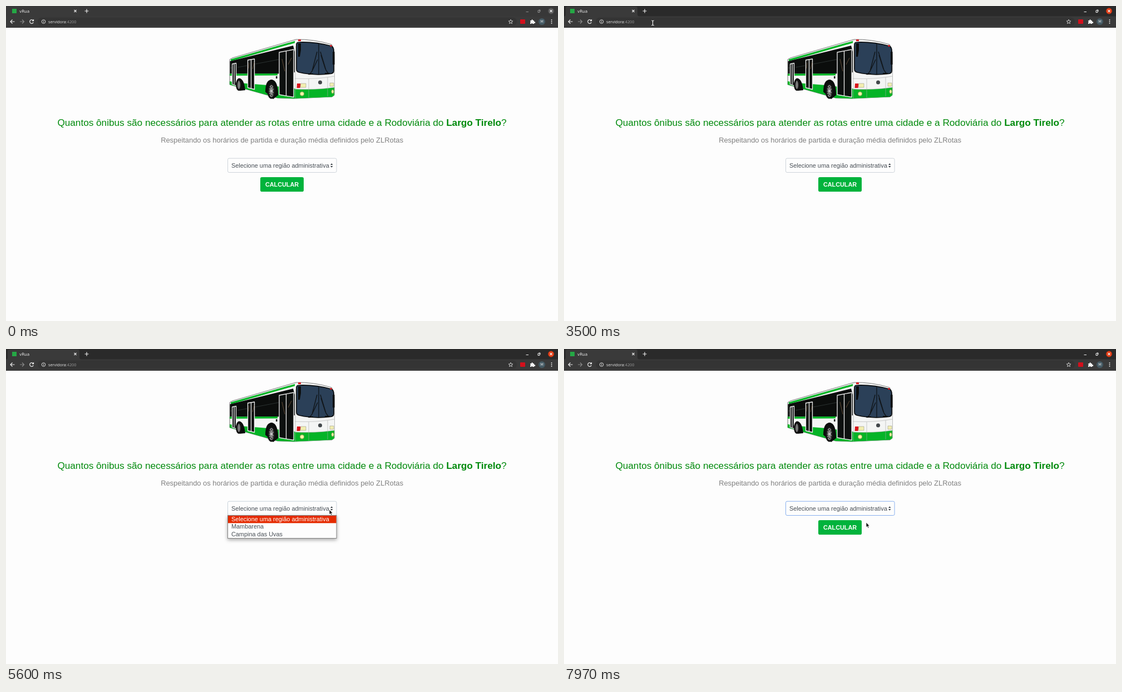
Animation of 992x565 px, one loop 8000 ms. Source, as an HTML page:

```html
<!DOCTYPE html>
<html lang="pt-BR">
<head>
<meta charset="utf-8">
<title>vRua</title>
<style>
  html, body { margin: 0; width: 100%; height: 100%; overflow: hidden; background: #fdfdfd; }
  svg { display: block; width: 100vw; height: 100vh; }
  text { font-family: "Liberation Sans", Arial, sans-serif; }
  .mid { text-anchor: middle; }
  .heading { font-size: 17.18px; fill: #008a0c; }
  .lead { font-size: 12.9px; fill: #808080; }
  .field { font-size: 10.92px; fill: #495057; }
  .button { font-size: 10.85px; font-weight: bold; fill: #fff; }
  .tab { font: 7.3px "DejaVu Sans", sans-serif; fill: #e4e4e4; }
  .address { font: 7.3px "Open Sans", sans-serif; fill: #e8e8e8; }
  .icon { fill: none; stroke: #eee; stroke-width: 1.2; }
  .green { fill: #05b427; }
  .white { fill: #f4f5f4; }
  .black { fill: #0b0d0c; }
  .glass { fill: #0d100f; stroke: #eee; stroke-width: 1.3; }
</style>
</head>
<body>
<svg viewBox="0 0 992 565" preserveAspectRatio="none">
  <defs>
    <filter id="shadow" x="-10%" y="-20%" width="120%" height="160%">
      <feDropShadow dx="0" dy="2.5" stdDeviation="3" flood-opacity=".35"/>
    </filter>
  </defs>
  <rect width="992" height="565" fill="#fdfdfd"/>

  <!-- Browser bar -->
  <rect id="strip" width="992" height="20"/>
  <path d="M0 39V18.500Q3 18.500 3 15V4Q3 1 6 1H129Q132 1 132 4V15Q132 18.500 136 18.500H992V39Z" fill="#3a3a3a"/>
  <rect x="57" y="20.500" width="861" height="15" rx="7.500" fill="#343434"/>
  <rect x="11" y="5" width="8" height="8" fill="#25a845"/>
  <text class="tab" x="24" y="11.700">vRua</text>
  <g class="icon">
    <path d="M122.500 7l4 4m0-4l-4 4M141.500 9h7M145 5.500v7"/>
    <path d="M15.500 28H8M11.500 24.500L8 28l3.500 3.500"/>
    <path d="M25 28h7.500M29 24.500l3.500 3.500-3.500 3.500" stroke="#888"/>
    <path d="M49 26A3.400 3.400 0 1 0 49.300 29.300M49.500 24v2.700h-2.700"/>
    <circle cx="67.500" cy="28" r="3.300" stroke-width=".9"/>
    <path d="M67.500 27.500v2.300M67.500 25.900v.9" stroke-width=".9"/>
    <path d="M907 24.300l1.100 2.500 2.700.2-2.100 1.800.7 2.700-2.400-1.500-2.400 1.500.7-2.700-2.100-1.800 2.700-.2Z" stroke-width=".8"/>
  </g>
  <text class="address" x="76" y="30.600">servidora<tspan fill="#999">:4200</tspan></text>
  <rect x="924" y="24" width="9" height="8" rx="1" fill="#d3101c"/>
  <path d="M942 26h2.300a1.400 1.400 0 1 1 2.700 0H949v2.300a1.400 1.400 0 1 1 0 2.300V32H946.500a1.300 1.300 0 0 0-2.500 0H942v-2.400a1.300 1.300 0 0 0 0-2.400Z" fill="#f4f4f4"/>
  <circle cx="963" cy="28" r="6" fill="#455a64"/>
  <text class="tab mid" x="963" y="30.400" style="font-size:6.5px">M</text>
  <g fill="#eee"><circle cx="980.500" cy="25" r=".9"/><circle cx="980.500" cy="28" r=".9"/><circle cx="980.500" cy="31" r=".9"/></g>
  <g id="controls" class="icon" style="stroke-width:1">
    <path d="M934.500 10.500h4.500M956 8h3v3.500h-3ZM957.500 7h2.500v3"/>
  </g>
  <circle id="close" cx="979.500" cy="9" r="5.400"/>
  <path class="icon" d="M977.500 7l4 4m0-4l-4 4"/>

  <!-- Bus -->
  <g stroke-linejoin="round">
    <path class="white" d="M402 96L407 93 521 60Q552 59 585 69Q590 75 590 92V160L586 163 519 166 488 165 402 141Z" stroke="#444" stroke-width=".7"/>
    <path class="green" d="M404 95.500L520 62.500V66L404 99Z"/>
    <path class="black" d="M402.500 99L516 71 519 82V119L488 121.500 402.500 121.500Z"/>
    <path class="green" d="M402 121.500L488 121V124.500L402 125Z"/>
    <path class="green" d="M402 135L420 138 470 142 519 148V166L488 165 402 141Z"/>
    <path d="M403 111h3M416 110l17-3M448 104l42-8" stroke="#343c3a" stroke-width=".8"/>
    <g class="glass">
      <path d="M406.500 104L413.500 102.500V143L406.500 140.500ZM410 103.500V141.500"/>
      <path d="M434.500 97L446.500 95V149.500L434.500 146.500ZM440.500 96V148"/>
      <path d="M491 83L517 78V163.500L491 159ZM503.500 81V161.500"/>
    </g>
    <path d="M437 102l-1 10M443 113l3-12M496 95l5 22M507 105l6-12" fill="none" stroke="#775a40" stroke-width=".8"/>
    <path class="black" d="M413 140Q415 127 421 130Q428 133 430 151L420 152Z"/>
    <path class="black" d="M466 154Q466 132 478 132Q489 134 489 160L480 167Z"/>
    <g stroke="#111" stroke-width="2.800">
      <ellipse cx="418.500" cy="141.500" rx="4" ry="9" fill="#777"/>
      <ellipse cx="477" cy="152.500" rx="6" ry="12.500" fill="#888"/>
    </g>
    <ellipse cx="477" cy="152.500" rx="4" ry="8" fill="none" stroke="#191919" stroke-width="2" stroke-dasharray="2 2"/>
    <circle cx="477" cy="152.500" r="2" fill="#ccc"/>
    <path class="white" d="M519 63Q553 61 586 71L590 85V160L586 163 519 166Z"/>
    <path class="green" d="M519 149Q556 151 590 146V160L586 163 519 166Z"/>
    <path d="M519 149Q556 151 590 146M519 130Q557 132 590 126M520 72V166M544 131v33M578 128v34" fill="none" stroke="#aaa" stroke-width=".6"/>
    <path d="M522 69Q522 65 527 65Q556 64 585 72Q589 74 589 81V116Q589 121 583 121.500Q553 125 527 119Q522 118 522 113Z" fill="#2b4058" stroke="#090c0f" stroke-width="1.700"/>
    <path d="M562 67V122" stroke="#0b1014" stroke-width="1.200"/>
    <path d="M545 123l5-6 10-21M580 122l-5-7-10-33M550 117l9-35M574 113l-8-25" fill="none" stroke="#11161a" stroke-width="1.400"/>
    <path d="M525 67h5v12l-2 12h-3ZM587 82h3.500v23H587Z" class="black"/>
    <path d="M525 60h5v3h-5ZM582.500 70h3v3h-3ZM523 139h6.500l-1 8h-6Z" fill="#d8141b"/>
    <path d="M530 139h9v7h-10ZM582 138h7v6h-7Z" fill="#f3efb0" stroke="#998" stroke-width=".6"/>
    <g fill="#f7f6a6" stroke="#7c9b51" stroke-width="1"><circle cx="532" cy="157.500" r="3.700"/><ellipse cx="587" cy="153.500" rx="2.200" ry="3.500"/></g>
    <path class="black" d="M485 126h2.500v4H485ZM543 121h9v2h-9ZM573 120h9v2h-9Z"/>
    <circle cx="564.500" cy="137" r="3.500" fill="#42474a"/>
  </g>

  <!-- Form -->
  <text class="heading mid" x="496" y="215">Quantos ônibus são necessários para atender as rotas entre uma cidade e a Rodoviária do <tspan font-weight="bold">Largo Tirelo</tspan>?</text>
  <text class="lead mid" x="496" y="245.400">Respeitando os horários de partida e duração média definidos pelo ZLRotas</text>
  <rect id="select" x="398.500" y="273.200" width="195.500" height="25.300" rx="2.500" fill="#fdfdfd"/>
  <text class="field" x="404.900" y="289.800">Selecione uma região administrativa</text>
  <path d="M583 285l2.200-2.700 2.200 2.700ZM583 287l2.200 2.700 2.200-2.700Z" fill="#343a40"/>
  <rect x="457" y="307" width="78" height="26" rx="2.800" fill="#00b33c"/>
  <text class="button mid" x="496" y="324.100">CALCULAR</text>

  <g id="menu">
    <rect x="398.500" y="298.500" width="195.500" height="41" fill="#fdfdfd" stroke="#777" stroke-width=".9" filter="url(#shadow)"/>
    <rect id="highlight" x="399" width="194.500" height="13.300" fill="#e52b00"/>
    <text class="field option" x="404.900" y="309.100">Selecione uma região administrativa</text>
    <text class="field option" x="404.900" y="322.400">Mambarena</text>
    <text class="field option" x="404.900" y="335.700">Campina das Uvas</text>
  </g>

  <g id="cursor">
    <path id="arrow" d="M0 0V8.700L2 7 3.500 10.200 5 9.500 3.600 6.400H6.200Z" fill="#161616" stroke="#fff" stroke-width=".7"/>
    <path id="beam" d="M-2.200-4Q0-4 0-3V4Q0 4.600-2.200 4.600M2.200-4Q0-4 0-3V4Q0 4.600 2.200 4.600" fill="none" stroke="#fff" stroke-width="1.100"/>
  </g>
</svg>
<script>
  const LOOP = 8000, APPEAR = 700, FOCUS = 3450, OPEN = 5590, CLOSE = 7700;
  const ROW = 13.3, MENU_TOP = 299;
  const path = [ // time, x, y
    [0, 500, 335], [780, 500, 335], [1270, 384, 229], [1480, 384, 229],
    [1500, 379, 219], [1930, 141, 93], [2260, 141, 93], [2700, 159.5, 30],
    [4250, 159.5, 30], [4770, 284, 70], [5450, 581, 288], [5850, 581, 288],
    [6500, 530, 321], [7260, 530, 321], [7600, 541, 304], [7700, 541, 304],
    [7940, 543, 311], [LOOP, 543, 311]
  ];
  const el = id => document.getElementById(id);
  const options = document.querySelectorAll(".option");
  const show = (id, on) => el(id).setAttribute("visibility", on ? "visible" : "hidden");
  const paint = (id, attr, value) => el(id).setAttribute(attr, value);

  function cursorAt(t) {
    const i = path.findIndex(p => p[0] > t);
    const [t0, x0, y0] = path[i - 1], [t1, x1, y1] = path[i];
    const u = (t - t0) / (t1 - t0), k = u * u * (3 - 2 * u);
    return [x0 + (x1 - x0) * k, y0 + (y1 - y0) * k];
  }

  function draw(now) {
    const t = now % LOOP;
    const [x, y] = cursorAt(t);
    const focused = t >= FOCUS, open = t >= OPEN && t < CLOSE;
    const visible = t >= APPEAR, overAddress = y > 19 && y < 38;

    paint("strip", "fill", focused ? "#2a2a2a" : "#383838");
    paint("close", "fill", focused ? "#e23a12" : "#5a5a5a");
    paint("controls", "opacity", focused ? 1 : .45);

    const ring = Math.min(1, Math.max(0, (t - OPEN) / 150));
    const mix = (a, b) => Math.round(a + (b - a) * ring);
    paint("select", "stroke", `rgb(${mix(206, 137)},${mix(212, 176)},${mix(218, 239)})`);

    show("menu", open);
    const row = Math.min(2, Math.max(0, Math.floor((y - MENU_TOP) / ROW)));
    paint("highlight", "y", MENU_TOP + row * ROW);
    options.forEach((o, i) => o.style.fill = i === row ? "#fff" : "#495057");

    paint("cursor", "transform", `translate(${x} ${y})`);
    show("arrow", visible && !overAddress);
    show("beam", visible && overAddress);
    requestAnimationFrame(tick);
  }

  let start;
  function tick(now) {
    start ??= now;
    draw(Math.max(0, now - start));
  }
  draw(0);
</script>
</body>
</html>
```
